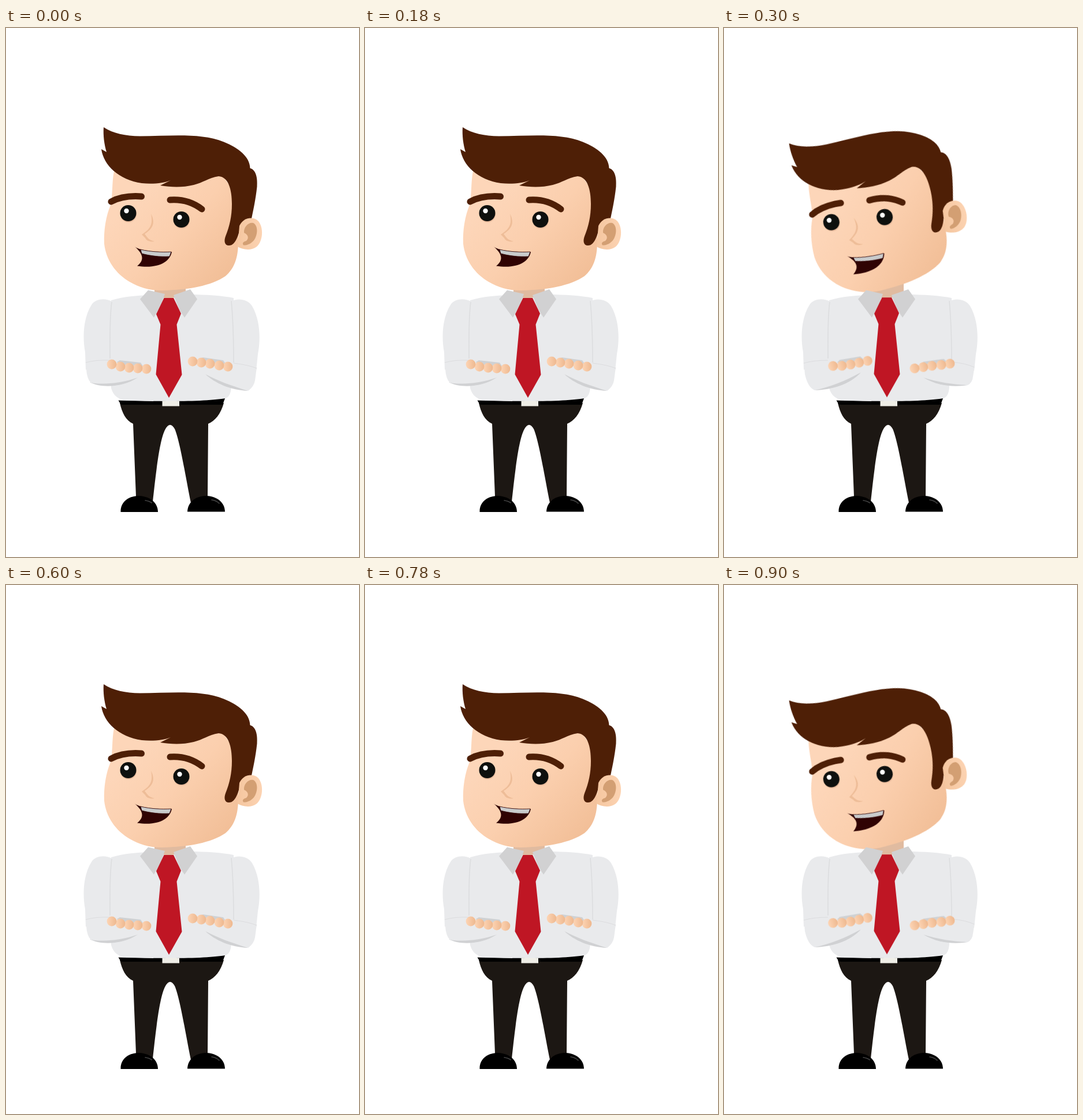
Animation, 611 px wide and 917 px high, one loop 1200 ms. Source, as an HTML page:

```html
<!DOCTYPE html>
<html lang="en">
<head>
<meta charset="utf-8">
<title>Talking man</title>
<style>
  html, body { margin: 0; width: 100%; height: 100%; overflow: hidden; background: #fff; }
  svg { display: block; width: 100%; height: 100%; }
  .head, .mouth, .hand, .tie, .down, .up { animation: 600ms step-end infinite; transform-origin: 0 0; }
  .head { animation-name: nod; }
  .mouth { animation-name: talk; }
  .hand.l { animation-name: wave-left; }
  .hand.r { animation-name: wave-right; }
  .tie { animation-name: lift; }
  .down { animation-name: hide; }
  .up { animation-name: show; }
  @keyframes nod { 50% { transform: matrix(.977, -.213, .213, .977, -89.2, 68); } }
  @keyframes talk { 50% { transform: translate(2.4px, 5px); } }
  @keyframes wave-left { 50% { transform: matrix(.961, -.276, .276, .961, -148.2, 76.2); } }
  @keyframes wave-right { 50% { transform: matrix(.961, -.276, .276, .961, -140, 123.8); } }
  @keyframes lift { 50% { transform: translateY(-.8px); } }
  @keyframes hide { 0% { visibility: visible; } 50% { visibility: hidden; } }
  @keyframes show { 0% { visibility: hidden; } 50% { visibility: visible; } }
  .shirt { fill: #e9eaec; }
  .shade { fill: #d0d1d3; }
  .seam { fill: none; stroke: #dcdddf; stroke-width: 1.6; }
  .cuff { fill: none; stroke: #d8d9db; stroke-width: .8; }
  .hair { fill: #4e1f06; }
  .brow { fill: none; stroke: #4e1f06; stroke-width: 11; stroke-linecap: round; }
</style>
</head>
<body>
<svg viewBox="0 0 611 917" xmlns="http://www.w3.org/2000/svg">
  <defs>
    <linearGradient id="skin" gradientUnits="userSpaceOnUse" x1="215" y1="300" x2="365" y2="445">
      <stop offset="0" stop-color="#fdd6b9"/>
      <stop offset=".45" stop-color="#fbcfae"/>
      <stop offset="1" stop-color="#f2bf98"/>
    </linearGradient>
    <linearGradient id="ear" x1="0" x2="1">
      <stop offset="0" stop-color="#f5c69f"/>
      <stop offset="1" stop-color="#fcd3b2"/>
    </linearGradient>
    <linearGradient id="finger" x1="0" x2="1">
      <stop offset="0" stop-color="#fdd5b5"/>
      <stop offset="1" stop-color="#eeb88f"/>
    </linearGradient>
  </defs>

  <!-- legs -->
  <path fill="#1c1713" d="M197,650C201,667 207,680 220,686L225,812L254,821C260,766 266,714 275.500,696Q284,680 292.500,696C302,720 312,785 320,823L349,812L350,686C361,682 372,669 377,650Z"/>
  <path d="M198.500,839C198,820 214,811 230,811C250,812 263,823 263,839ZM314,838.500C315,820 330,811 347,811C366,812 379,823 379,838.500Z"/>
  <path fill="none" stroke="#444" stroke-width="1.7" stroke-linecap="round" d="M241,819Q248,820 252,823M356,818Q364,819 369,824"/>

  <!-- torso -->
  <path fill="#e0bba0" d="M257,440H311V472H257Z"/>
  <path class="shirt" d="M182,472C205,465 228,464 246,463L282,469L318,462C345,462 375,464 394,468L395,580L390,622C389,636 385,641 377,643C330,647 265,649 214,647C195,645 186,638 182,624L180,580Z"/>
  <path d="M194.500,645.500C255,647.500 340,648.500 379,642L375,653H199Z"/>
  <path fill="#efeee7" d="M270.500,646.500H300V655.500H270.500Z"/>

  <!-- arms -->
  <path class="shirt" d="M183,474C172,468 155,469 148,480C134,502 132,535 137,562L138,592H180Z"/>
  <path class="shirt" d="M390,474C399,468 418,469 426,482C440,506 441,540 436,565L433,594H394Z"/>
  <path class="seam" d="M183,475C179,505 180,545 180,573M390,473C393,505 394,545 394,580"/>
  <g class="down">
    <path class="shade" d="M145,614C163,624 200,624 228,606Z"/>
    <path class="shirt" d="M138,578L139,592Q140,608 147,615C172,619 202,615 228,606L184,580Z"/>
    <path class="cuff" d="M138,580Q155,575 180,576"/>
    <path class="shade" d="M345,600C362,616 389,628 419,629Z"/>
    <path class="shirt" d="M345,600C367,612 390,620 419,629Q429,622 431,611L434,588L390,582Z"/>
    <path class="cuff" d="M394,581Q420,584 434,590"/>
  </g>
  <g class="up">
    <path class="shade" d="M157,628C187,627 218,618 237,597Z"/>
    <path class="shirt" d="M138,578L140,600Q145,623 157,628C185,622 211,611 237,597L184,580Z"/>
    <path class="cuff" d="M138,581Q155,576 180,576"/>
    <path class="shade" d="M345,606C369,620 396,623 422,619Z"/>
    <path class="shirt" d="M345,606C370,614 397,618 422,619Q430,615 431,604L434,585L392,580Z"/>
    <path class="cuff" d="M394,579Q418,581 433,588"/>
  </g>
  <g class="hand l" id="left"><path fill="#cfd1d3" d="M192,579L197,576L233,580L237,586L230,593L198,589Z"/></g>
  <g class="hand r" id="right"><path fill="#cfd1d3" d="M334,574L341,571L376,576L380,582L372,588L340,582Z"/></g>

  <!-- head -->
  <g class="head">
    <path fill="url(#skin)" d="M187,248C183,268 185,290 181,307C173,326 169,350 170,374C173,402 190,426 214,440C230,449 247,455 270,455C316,454 355,447 380,430C395,417 402,399 402,370L405,300L368,245L210,235Z"/>
    <path class="hair" d="M169,172C185,183 207,187 232,187.500C290,187 338,182 377,197.500C402,207.500 422,223 422.500,243C433,246 435.500,260 434.500,275C432,298 428,316 424,335L404,352C400,366 395,377 386,377C378,377 377,369 380,361C387,344 391,326 391,305C391,280 385,258 368,257C350,260 341,268 325,272C305,277 285,276 267,273L285,264C274,269 253,271 235,269C195,263 169,238 165,210L174,215C170,202 168,186 169,172Z"/>
    <path fill="url(#ear)" d="M404,343C411,328 428,326 437,335C446,346 445,369 434,379C424,387 409,384 401,379Z"/>
    <path fill="#d39f73" d="M412,355C411,345 420,336 428,338C436,342 436,356 431,365C426,374 417,377 411,376.500C408,372 412,370 416,369C421,364 419,358 412,355Z"/>
    <path class="brow" d="M182,301C196,293.500 214,290.500 234.500,292M284,298C305,296.500 324,302.500 339,314"/>
    <g id="eyes"></g>
    <path fill="#eebd98" d="M251,322C260,340 252,349 240,357C245,363 246,367 257,370C249,371 243,369 241,364L235,358C252,347 254,339 251,322Z"/>
    <g class="mouth">
      <path fill="#300303" d="M223,379C230,385 254,389 287,388C284,405 264,418 227,412.500C238,404 240,394 223,379Z"/>
      <path fill="#c9cbcc" stroke="#300303" stroke-width=".8" d="M233,384C251,388 268,389 286,388L283,396C266,397 250,395 235,391Z"/>
    </g>
  </g>

  <!-- collar and tie -->
  <path fill="#d1d1d2" d="M246,454.500L275,461L269,478L256,502L232,470ZM319,453L331,470L309,502L300,488L290,463Z"/>
  <path class="tie" fill="#bf1624" d="M273.500,468H290L303,495L295.500,514L304.500,601L282,641L259.500,600.500L267.500,514L260,496Z"/>
</svg>
<script>
  const add = (parent, tag, attrs) => {
    const node = document.createElementNS("http://www.w3.org/2000/svg", tag);
    for (const key in attrs) node.setAttribute(key, attrs[key]);
    parent.append(node);
  };
  const byId = id => document.getElementById(id);

  const fingers = {
    left: [[243, 591], [228, 590], [213, 589], [198, 587], [183, 583]],
    right: [[384, 587], [369, 585], [353, 582], [338, 580], [323, 578]],
  };
  for (const side in fingers)
    for (const [cx, cy] of fingers[side])
      add(byId(side), "ellipse", { cx, cy, rx: 8.4, ry: 8.4, fill: "url(#finger)" });

  for (const [x, y] of [[211.5, 321], [303.5, 332]]) {
    const dot = (dx, dy, r, fill) => add(byId("eyes"), "circle", { cx: x + dx, cy: y + dy, r, fill });
    dot(.5, 2, 14, "#e8bb9c");
    dot(0, 0, 14, "#0e100e");
    dot(-3, -4, 4.2, "#fff");
  }
</script>
</body>
</html>
```
